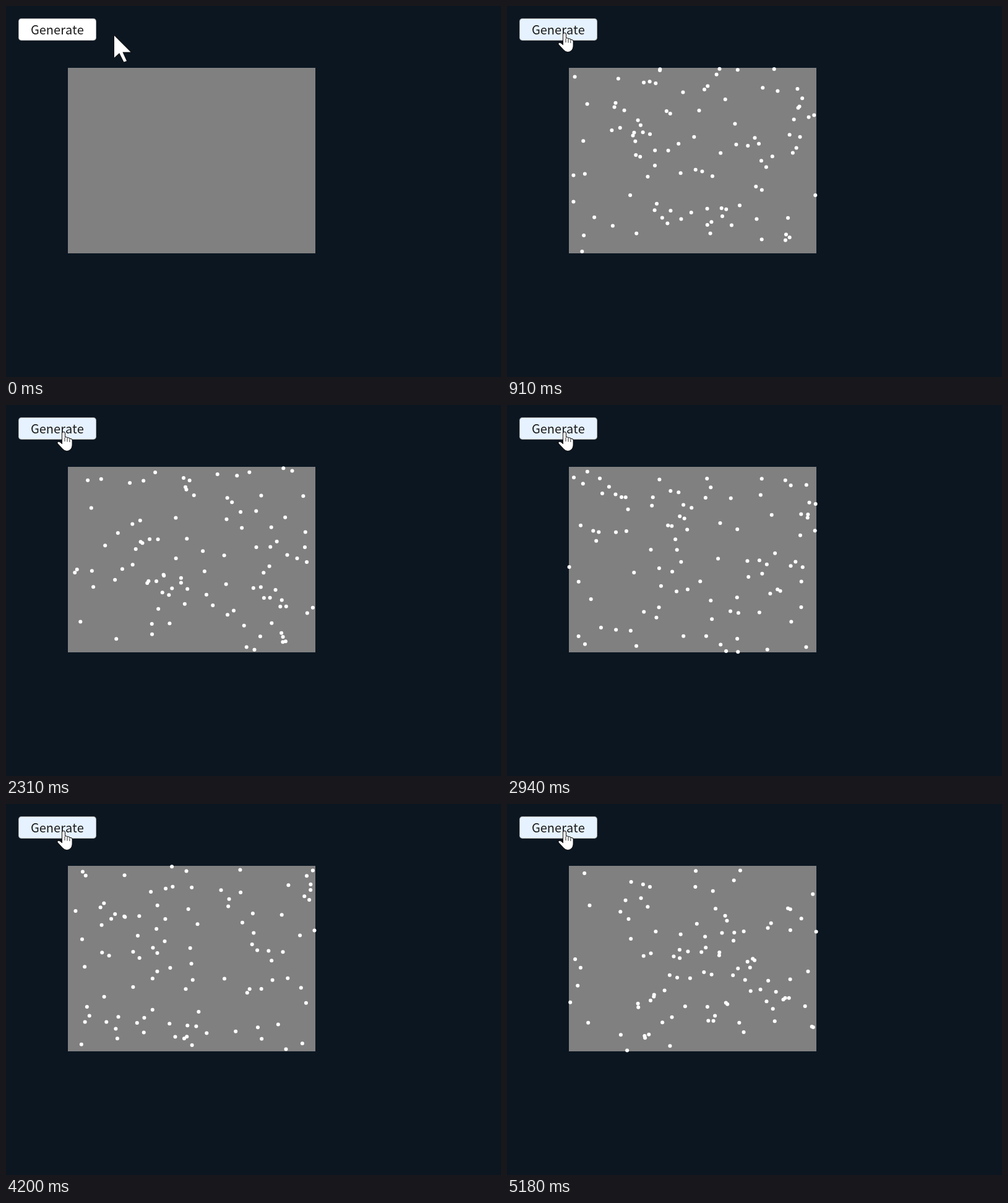
An HTML page with a canvas for the animation above (5.74 s loop, 800 by 600 pixels).

```html
<!DOCTYPE html>
<html lang="en">
<head>
<meta charset="utf-8">
<title>Random points</title>
<style>
html, body { margin: 0; width: 100%; height: 100%; overflow: hidden; background: #0b1621; }
canvas { display: block; width: 800px; height: 600px; }
</style>
</head>
<body>
<canvas id="stage" width="800" height="600"></canvas>
<script>
const ctx = document.getElementById('stage').getContext('2d');
const LOOP = 5740, STEP = 70;
const CLICKS = [910, 1680, 2310, 2940, 3570, 4200, 4690, 5180];
const PRESS = 4690;
const HOVER = 420;
// Pointer hotspots, one per step from 280 ms on
const PATH = [[172, 54], [159, 56], [141, 54], [123, 51], [108, 48], [98, 45], [93, 44]];

const ARROW = new Path2D('M0 0V35.5L8.2 28L15.5 42.5L20 41L13.4 26.4H26.5Z');
const HAND = new Path2D(
  'M-2 2Q-2 0 0 0Q2 0 2 2V9.5Q2.2 8 4 8.2Q5.8 8.4 6 10.2Q6.5 9 8 9.3' +
  'Q9.7 9.6 9.9 11.6Q10.5 10.7 11.8 11Q13.6 11.4 13.6 13.6V20' +
  'Q13.6 25 10.5 28Q8.4 30 5 30Q1.5 30-1.2 26.8L-8.9 18.6' +
  'Q-10.5 16.8-8.9 16Q-7.5 15.4-5.8 16.5L-2 19.5Z');
const CREASES = new Path2D('M2 9V15M6 10V15.5M9.9 11.5V16');

function seededRandom(seed) {
  return () => {
    seed = (seed + 0x6D2B79F5) | 0;
    let n = Math.imul(seed ^ (seed >>> 15), 1 | seed);
    n = (n + Math.imul(n ^ (n >>> 7), 61 | n)) ^ n;
    return ((n ^ (n >>> 14)) >>> 0) / 4294967296;
  };
}

function drawDots(seed) {
  const random = seededRandom(seed);
  ctx.fillStyle = '#fff';
  for (let i = 0; i < 100; i++) {
    const x = 100 + random() * 400;
    const y = 100 + random() * 300;
    ctx.beginPath();
    ctx.arc(x, y, 3, 0, Math.PI * 2);
    ctx.fill();
  }
}

function drawButton(hover, pressed) {
  ctx.beginPath();
  ctx.roundRect(20, 20, 126, 36, 4.8);
  ctx.fillStyle = pressed ? '#8b9bab' : '#ababab';
  ctx.fill();
  ctx.beginPath();
  ctx.roundRect(21, 21, 124, 34, 3.8);
  ctx.fillStyle = hover ? '#e6f2ff' : '#fff';
  ctx.fill();
  ctx.fillStyle = '#1a1a1a';
  ctx.font = '20px "Noto Sans CJK JP", "Noto Sans CJK SC", "Noto Sans CJK", "Noto Sans", sans-serif';
  ctx.fontKerning = 'none';
  ctx.fillText('Generate', 40, 46);
}

function drawPointer(x, y, hand) {
  const shape = hand ? HAND : ARROW;
  ctx.save();
  ctx.translate(x, y);
  ctx.lineJoin = 'round';
  ctx.lineWidth = 2;
  ctx.strokeStyle = '#111';
  ctx.stroke(shape);
  ctx.fillStyle = '#fff';
  ctx.fill(shape);
  if (hand) {
    ctx.lineWidth = 0.9;
    ctx.stroke(CREASES);
  }
  ctx.restore();
}

function pointerAt(t) {
  if (t < 280) return [175, 48];
  return PATH[Math.min(Math.floor((t - 280) / STEP), PATH.length - 1)];
}

function draw(t) {
  const hover = t >= HOVER;
  const clicks = CLICKS.filter(c => t >= c).length;
  ctx.fillStyle = '#0b1621';
  ctx.fillRect(0, 0, 800, 600);
  ctx.fillStyle = '#808080';
  ctx.fillRect(100, 100, 400, 300);
  if (clicks) drawDots(clicks * 7919);
  drawButton(hover, t >= PRESS && t < PRESS + STEP);
  drawPointer(...pointerAt(t), hover);
}

const start = performance.now();
function tick() {
  draw((performance.now() - start) % LOOP);
  requestAnimationFrame(tick);
}
tick();
</script>
</body>
</html>
```
